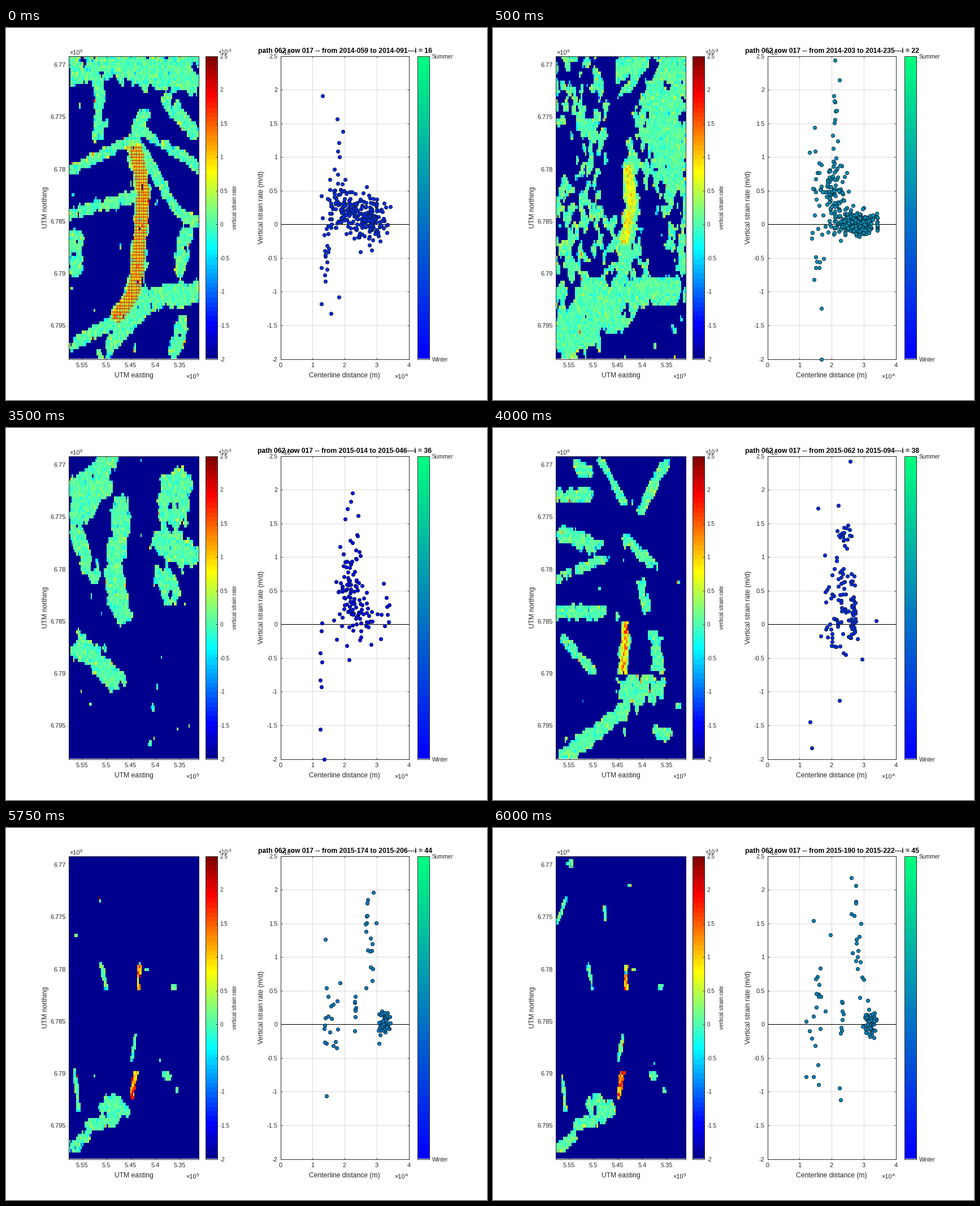
Recreate the animation shown at these times as a matplotlib script. Size 851 by 658 pixels, loop 8000 ms.

```python
import numpy as np
import matplotlib.pyplot as plt
from matplotlib.animation import FuncAnimation
from matplotlib.colors import ListedColormap

W, H, DPI = 851, 658, 100
STEP = 250
ROWS, COLS = 97, 89
LEFT, RIGHT, TOP, BOTTOM = 111, 341, 49.5, 585.5
INK = "#262626"
VALUES = np.arange(-2, 2.6, 0.5)

plt.rcParams["font.family"] = "Liberation Sans"

X, Y = np.meshgrid(
    np.linspace(LEFT, RIGHT, COLS), np.linspace(TOP, BOTTOM, ROWS))


def jet64():
    v = np.arange(1, 65) / 64
    bands = [1.5 - np.abs(4 * v - k) for k in (3, 2, 1)]
    return ListedColormap(np.clip(np.transpose(bands), 0, 1))


def glow(width, *path):
    """Plateau of height 1 along a polyline, falling off at the given width."""
    p = np.reshape(path, (-1, 2)).astype(float)
    if len(p) == 1:
        p = np.vstack([p, p + 1])
    best = np.full(X.shape, np.inf)
    for (ax, ay), (bx, by) in zip(p[:-1], p[1:]):
        dx, dy = bx - ax, by - ay
        t = np.clip(((X - ax) * dx + (Y - ay) * dy) / (dx * dx + dy * dy), 0, 1)
        best = np.minimum(best, np.hypot(X - ax - t * dx, Y - ay - t * dy))
    return np.exp(-np.minimum(best / width, 5) ** 4)


def smooth(a):
    for axis in (0, 1, 0, 1):
        a = (np.roll(a, 1, axis) + 2 * a + np.roll(a, -1, axis)) / 4
    return a


def strain_map(rng, base, cover, hot):
    """Cells hold data where cover plus noise is positive; negative widths carve."""
    field = np.full(X.shape, base)
    for width, *path in cover:
        field += (np.sign(width) - field) * glow(abs(width), *path)
    noise = smooth(rng.normal(size=X.shape))
    valid = field + 0.45 * noise / noise.std() > 0
    edge = 1 - smooth(valid.astype(float))
    value = 0.03 + (0.09 + 0.3 * edge) * rng.standard_t(3, X.shape)
    for level, *stroke in hot:
        value += level * glow(*stroke) * rng.uniform(0.4, 1.4, X.shape)
    return np.where(valid, np.clip(value, -1.5, 2.5), -2)


def scatter_points(rng, singles, clouds):
    parts = [np.reshape(singles, (-1, 2))]
    for n, cx, cy, sx, sy in clouds:
        parts.append(rng.normal((cx, cy), (sx, sy), (n, 2)))
    return np.clip(np.vstack(parts), (1.2, -2), (3.42, 2.5))


scenes = []


def scene(start, dates, index, cover, hot, singles, clouds, base=-1.1):
    rng = np.random.default_rng(index)
    season = int(dates[5:8]) / 365
    scenes.append(dict(
        start=start,
        title=f"path 062 row 017 -- from {dates}---i = {index}",
        color=(0, season, 1 - season / 2),
        grid=strain_map(rng, base, cover, hot),
        points=scatter_points(rng, singles, clouds)))


trunk = (229, 213, 243, 290, 231, 440, 222, 475, 198, 508)

scene(0, "2014-059 to 2014-091", 16, [
    (32, 135, 70, 190, 62), (38, 235, 72, 325, 78), (10, 165, 60, 162, 190),
    (14, 285, 125, 335, 185), (11, 245, 150, 225, 195, 115, 250),
    (10, 235, 205, 300, 320, 335, 345), (10, 240, 180, 340, 245),
    (13, 112, 330, 225, 300), (15, 120, 370, 125, 430), (13, 320, 365, 310, 430),
    (15, *trunk), (24, 330, 468, 235, 490), (15, 250, 490, 170, 580),
    (12, 112, 565, 205, 515), (14, 315, 520, 300, 575),
], [(0.7, 12, *trunk)], [1.31, 1.91, 1.77, 1.56, 1.58, -1.32, 1.82, -1.08], [
    (45, 1.75, .37, .2, .2), (60, 2.05, .22, .25, .15), (165, 2.75, .06, .3, .17),
    (18, 1.45, -.1, .12, .35), (6, 1.85, 1.1, .1, .15)])

scene(500, "2014-203 to 2014-235", 22, [
    (46, 265, 80, 325, 75), (32, 300, 150, 320, 250), (-18, 125, 185, 130, 240),
    (-13, 195, 60, 225, 140), (-20, 222, 150, 215, 300), (-10, 240, 140, 285, 60),
    (-20, 262, 280, 300, 440), (14, 239, 250, 245, 310, 230, 440),
    (44, 125, 540, 195, 505), (28, 190, 475, 310, 470),
    (-48, 225, 590, 330, 545), (-18, 265, 520, 330, 505),
], [(0.8, 9, 239, 250, 245, 310, 233, 375)], [2.11, 2.44, 1.69, -2, 1.69, -1.25], [
    (90, 2.05, .4, .18, .28), (220, 2.78, .02, .33, .09), (16, 2.1, 1.3, .08, .45),
    (14, 1.55, .7, .1, .4), (9, 1.5, -.4, .15, .3)], base=0.0)

winter = [
    (20, 180, 55, 120, 115), (24, 125, 150, 165, 105), (19, 206, 135, 190, 250, 205, 330),
    (32, 300, 100, 295, 150), (28, 280, 200, 320, 225), (20, 275, 260, 295, 300),
    (16, 125, 190, 150, 260), (24, 135, 390, 190, 445), (9, 248, 300, 229, 410),
    (12, 165, 535, 240, 480), (17, 270, 505, 295, 500), (11, 245, 525, 200, 570),
]
winter_hot = [(1, 8, 248, 305, 229, 410)]
winter_clouds = [
    (50, 2.15, .65, .2, .22), (62, 2.35, .1, .33, .23), (12, 2.2, 1.3, .2, .25),
    (8, 1.33, -.5, .08, .6), (8, 3.25, .1, .12, .3)]

scene(2750, "2014-347 to 2015-014", 32, winter, winter_hot,
      [2.58, 2.07, 1.38, -1.8, 3.31, .9], winter_clouds, base=-0.85)
scene(3500, "2015-014 to 2015-046", 36, winter[:8], winter_hot, [], winter_clouds)

spring = [
    (13, 150, 65, 165, 75), (7, 190, 55, 232, 130), (10, 305, 60, 262, 145),
    (14, 118, 120, 165, 118), (15, 118, 185, 180, 205), (10, 115, 265, 192, 232),
    (10, 238, 195, 278, 238), (9, 265, 275, 272, 320), (14, 112, 326, 190, 328),
    (11, 236, 350, 230, 432), (12, 287, 370, 292, 425), (30, 250, 465, 280, 465),
    (15, 230, 500, 130, 582), (13, 295, 540, 308, 545), (9, 125, 375, 175, 430),
]
spring_hot = [(1.2, 6, 236, 345, 230, 435)]
spring_clouds = [
    (45, 2.2, .5, .2, .33), (45, 2.67, .2, .06, .25), (18, 2.45, 1.35, .12, .13),
    (20, 2.2, -.2, .25, .2)]

scene(3750, "2015-046 to 2015-078", 37, spring[4:], spring_hot, [], spring_clouds)
scene(4000, "2015-062 to 2015-094", 38, spring, spring_hot,
      [2.58, 2.42, 1.57, 1.72, 1.33, -1.45, 1.38, -1.84, 3.4, .05, 2.25, -1.13],
      spring_clouds)

scene(5250, "2015-142 to 2015-174", 43, [
    (20, 215, 60, 270, 65), (12, 215, 100, 217, 155), (17, 322, 130, 330, 150),
    (30, 290, 180, 320, 210, 325, 280), (8, 248, 225, 312, 300), (4, 238, 185, 230, 325),
    (11, 180, 280, 178, 325), (5, 178, 325, 208, 430, 216, 485),
    (4, 242, 370, 245, 465), (8, 135, 495, 180, 465), (22, 122, 552, 140, 548),
], [(1, 6, 216, 475)], [1.43, 2.02, 2.9, 1.95, 2.04, -1.76], [
    (14, 1.48, .4, .07, .45), (22, 2.25, .03, .25, .12), (13, 3.05, .15, .15, .2),
    (14, 1.42, -1.1, .1, .45)], base=-1.25)

late = [
    (7, 134, 60), (4, 127, 125, 113, 165), (4, 198, 137, 198, 160), (5, 243, 100),
    (4, 168, 242, 177, 285), (4, 236, 243, 236, 282), (5, 249, 250), (6, 297, 281),
    (4, 230, 368, 222, 412), (5, 229, 435, 222, 480), (9, 285, 440), (4, 303, 465),
    (4, 121, 430, 127, 500), (22, 183, 490, 200, 500), (14, 150, 528, 185, 520),
    (11, 118, 568, 140, 550),
]
late_hot = [(1.6, 6, 229, 435, 222, 480), (1.3, 5, 236, 243, 236, 282)]
late_clouds = [
    (55, 3.22, .03, .1, .1), (18, 2.78, 1.2, .12, .4), (20, 1.55, .1, .18, .4),
    (8, 2.32, .2, .02, .2)]

scene(5750, "2015-174 to 2015-206", 44, late[4:], late_hot, [], late_clouds, base=-1.4)
scene(6000, "2015-190 to 2015-222", 45, late, late_hot,
      [2.62, 2.18, 1.43, 1.54, 1.97, 1.33, 2.24, -.95, 2.28, -1.12],
      late_clouds, base=-1.6)


fig = plt.figure(figsize=(W / DPI, H / DPI), dpi=DPI, facecolor="white")


def panel(x0, x1):
    ax = fig.add_axes((x0 / W, 1 - BOTTOM / H, (x1 - x0) / W, (BOTTOM - TOP) / H))
    ax.tick_params(direction="in", length=2.2, width=0.6, color=INK, labelcolor=INK,
                   labelsize=7.9, pad=3.6, top=True, right=True)
    ax.tick_params(axis="x", pad=5)
    for side in ax.spines.values():
        side.set(color=INK, linewidth=0.7)
    return ax


def text(x, y, s, px=12.1, color=INK, **kw):
    return fig.text(x / W, 1 - y / H, s, fontsize=px * 0.72, color=color, **kw)


def upright(x, s, px=12.1):
    text(x, 317, s, px, ha="center", va="center", rotation=90)


def power(x, y, exp, px=11):
    text(x, y, "×10", px)
    text(x + 1.7 * px, y - 4, exp, 8.5)


def colorbar(x0, cmap, ticks, labels):
    ax = panel(x0, x0 + 21)
    ax.imshow(np.linspace(0, 1, 64)[:, None], cmap=cmap, origin="lower",
              aspect="auto", extent=(0, 1, -2, 2.5), interpolation="nearest")
    ax.set_xticks([])
    ax.set_yticks(ticks, labels)
    ax.tick_params(axis="y", left=False, labelleft=False, labelright=True, labelsize=7.1)


names = [f"{v:g}" for v in VALUES]
jet = jet64()

left = panel(LEFT, RIGHT)
image = left.imshow(scenes[0]["grid"], cmap=jet, vmin=-2, vmax=2.5, aspect="auto",
                    interpolation="nearest", extent=(LEFT, RIGHT, BOTTOM, TOP))
inside = (glow(12, *trunk) > 0.5) & (Y > 211) & (Y < 521)
crosses, = left.plot(X[inside], Y[inside], "+", color="#d01808", ms=4.2, mew=0.55)
left.set(xlim=(LEFT, RIGHT), ylim=(BOTTOM, TOP))
k = np.arange(6)
left.set_xticks(134.5 + 43.1 * k[:5], [f"{v:.4g}" for v in 5.55 - 0.05 * k[:5]])
left.set_yticks(65 + 92.25 * k, [f"{v:.4g}" for v in 6.77 + 0.005 * k])
power(112, 47, "6")
power(318, 620, "5")
text(226, 618, "UTM easting", ha="center")
upright(69.5, "UTM northing")

colorbar(352.5, jet, VALUES, names)
power(375, 46, "-3", 10)
upright(405.5, "vertical strain rate", 9.9)

right = panel(485.5, 712.5)
right.set(xlim=(0, 4), ylim=(-2, 2.5), axisbelow=True)
right.set_xticks(k[:5])
right.set_yticks(VALUES, names)
right.grid(color=INK, alpha=0.17, linewidth=0.7)
right.axhline(0, color="black", linewidth=0.8)
dots, = right.plot([], [], "o", ms=4.5, mec="#0a1a20", mew=0.6, clip_on=False, zorder=3)
power(485, 47, "-3")
power(687, 620, "4")
text(599, 618, "Centerline distance (m)", ha="center")
upright(452.5, "Vertical strain rate (m/d)")
title = text(599.5, 44, "", color="black", ha="center", weight="bold", zorder=5)

colorbar(727.5, "winter", [-2, 2.5], ["Winter", "Summer"])


def draw(frame):
    now = [s for s in scenes if s["start"] <= frame * STEP][-1]
    image.set_data(now["grid"])
    crosses.set_visible(now is scenes[0])
    dots.set_data(*now["points"].T)
    dots.set_markerfacecolor(now["color"])
    title.set_text(now["title"])
    return image, crosses, dots, title


anim = FuncAnimation(fig, draw, frames=8000 // STEP, interval=STEP, repeat=True,
                     repeat_delay=0, blit=False)
plt.show()
```
